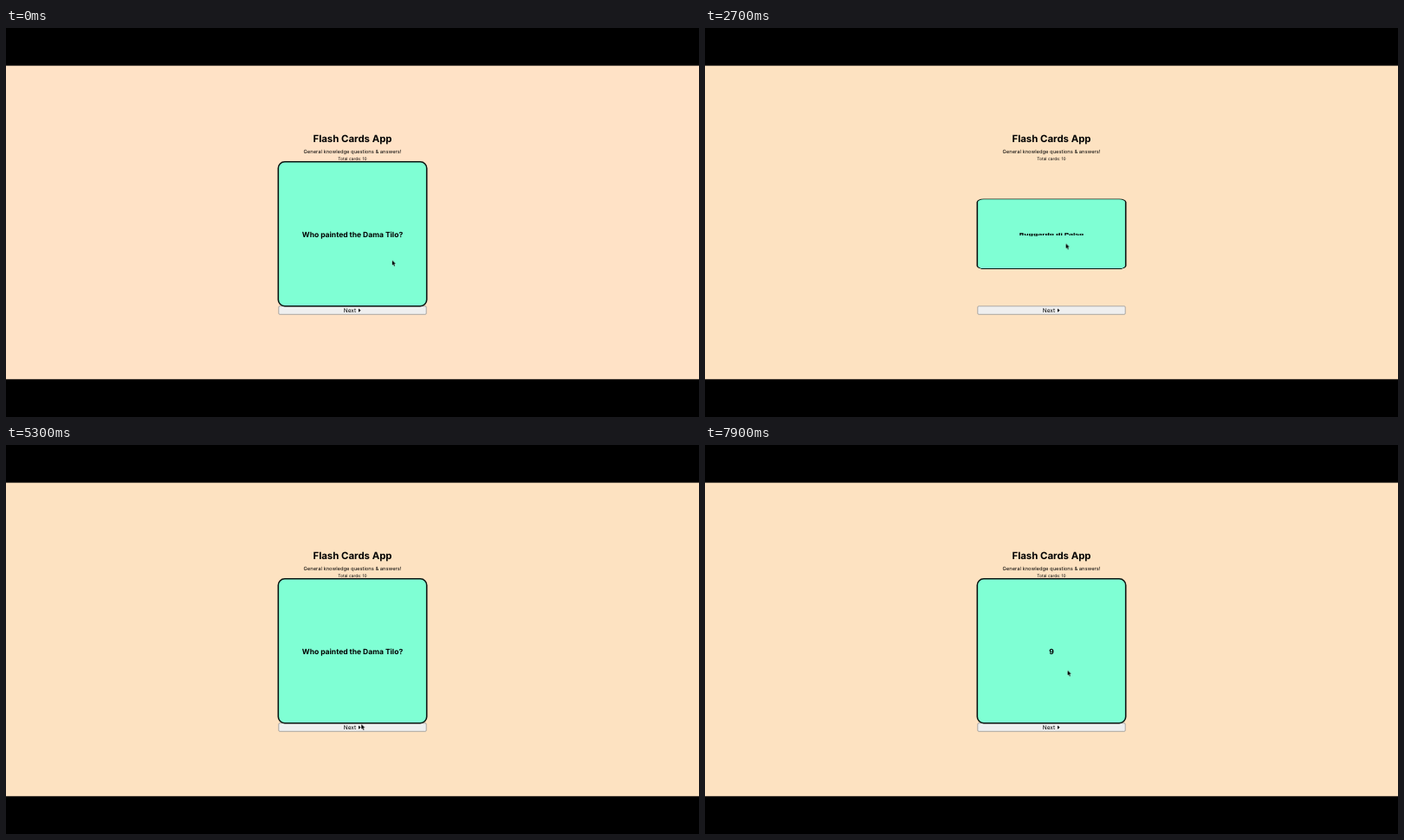
An HTML page for the animation above (8000 ms loop, 800x450 px).

```html
<!DOCTYPE html>
<html lang="en">
<head>
<meta charset="utf-8">
<title>Flash Cards App</title>
<style>
  html, body { margin: 0; width: 100%; height: 100%; overflow: hidden; background: #000; }

  .stage { --loop: 8000ms; position: relative; width: 800px; height: 450px; overflow: hidden; }
  svg { position: absolute; left: 0; top: 0; }
  text {
    font-family: Inter, "Liberation Sans", sans-serif;
    text-anchor: middle; text-rendering: geometricPrecision;
  }

  .page { fill: #fde2c1; animation: settle var(--loop) linear infinite; }
  .title { font-size: 11.4px; font-weight: 700; }
  .sub { font-size: 5.8px; }
  .total { font-size: 4.88px; }
  .next { font-size: 6.5px; text-anchor: start; }
  .button { fill: #efefef; stroke: #8b8b8b; stroke-width: .7; }

  /* Faces keep a clear margin so their edges stay smooth while turning */
  .card {
    position: absolute; left: 312px; top: 152px; width: 176px; height: 173px;
    transform-origin: 50% 86.25px; transform-style: preserve-3d;
    animation: flip var(--loop) ease infinite;
  }
  .face { width: 176px; height: 173px; transform-origin: 50% 86.25px; backface-visibility: hidden; }
  .back { transform: rotateX(180deg); }
  .face rect { fill: #7fffd4; stroke: #0b1512; stroke-width: 1.6; }
  .face text { font-size: 8.5px; font-weight: 700; animation: first var(--loop) step-end infinite; }
  .face text + text { animation-name: second; }

  .cursor {
    width: 6px; height: 9px; overflow: visible;
    animation: move var(--loop) ease-in-out infinite, show var(--loop) step-end infinite;
  }

  @keyframes settle {
    0%, 1% { fill: #ffe2c6; }
    9%, 100% { fill: #fde2c1; }
  }
  @keyframes flip {
    0%, 28.95% { transform: rotateX(0deg); }
    41.45%, 47.25% { transform: rotateX(180deg); }
    59.75%, 82.875% { transform: rotateX(0deg); }
    95.375%, 100% { transform: rotateX(180deg); }
  }
  @keyframes first { 0% { opacity: 1; } 68.75%, 100% { opacity: 0; } }
  @keyframes second { 0% { opacity: 0; } 68.75%, 100% { opacity: 1; } }
  @keyframes move {
    0% { transform: translate(445.8px, 268.8px); }
    8.75%, 13.75% { transform: translate(430.8px, 278.8px); }
    17.5%, 20% { transform: translate(428px, 273px); }
    28%, 36.25% { transform: translate(416.6px, 249.4px); }
    38.75%, 58.75% { transform: translate(416px, 240px); }
    67.5%, 73% { transform: translate(410px, 326.5px); }
    78.75%, 100% { transform: translate(418.6px, 260.8px); }
  }
  /* The pointer vanishes while it rests on the card text */
  @keyframes show {
    0% { opacity: 1; }
    37.5% { opacity: 0; }
    60%, 100% { opacity: 1; }
  }
</style>
</head>
<body>
<div class="stage">
  <svg width="800" height="450">
    <rect class="page" y="43.6" width="800" height="362.7"/>
    <text class="title" x="400" y="132.4">Flash Cards App</text>
    <text class="sub" x="400" y="144.5">General knowledge questions &amp; answers!</text>
    <text class="total" x="400" y="153">Total cards: 10</text>
    <rect class="button" x="314.8" y="321.8" width="170.4" height="9.5" rx="1.2"/>
    <text class="next" x="389.8" y="329">Next</text>
    <path d="M407 324.6l2.6 2.1l-2.6 2.1z"/>
  </svg>

  <div class="card">
    <svg class="face">
      <rect x="2.3" y="2.8" width="171.4" height="166.9" rx="7.5"/>
      <text x="88" y="89.5">Who painted the Dama Tilo?</text>
      <text x="88" y="89.5">What is the square root of 81?</text>
    </svg>
    <svg class="face back">
      <rect x="2.3" y="2.8" width="171.4" height="166.9" rx="7.5"/>
      <text x="88" y="89.5">Ruggardo di Palso</text>
      <text x="88" y="89.5">9</text>
    </svg>
  </div>

  <svg class="cursor" viewBox="0 0 6 9">
    <path d="M0 0V5.6L1.3 4.5L2.2 6.7L3.2 6.3L2.3 4.1H4Z"
          fill="#000" stroke="#fff" stroke-opacity=".6" stroke-width=".6" paint-order="stroke"/>
  </svg>
</div>
</body>
</html>
```
